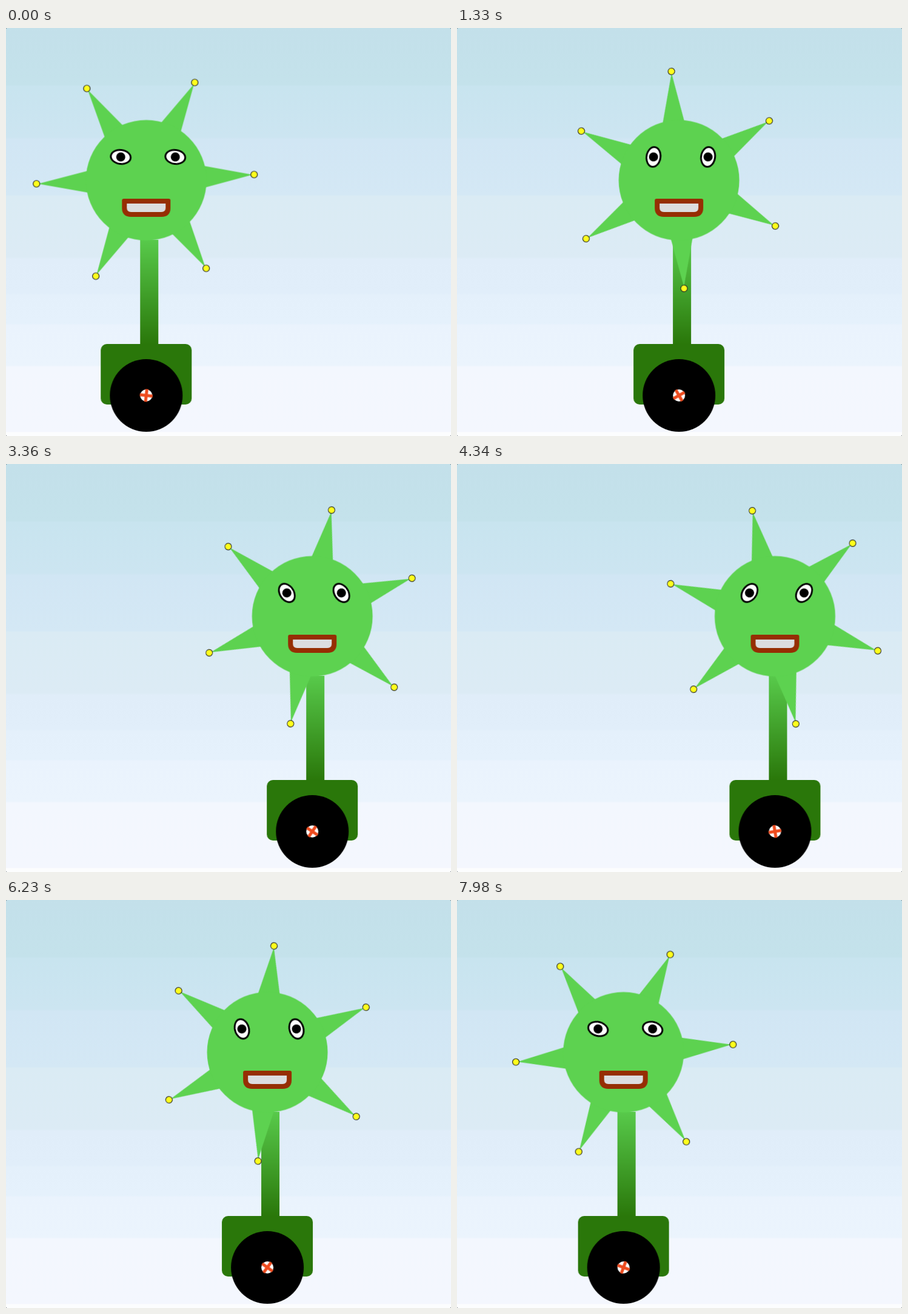
These frames come from a looping animation (734x674 px, 8000 ms). An HTML page:

```html
<!DOCTYPE html>
<html lang="en">
<head>
<meta charset="utf-8">
<title>Rolling sun robot</title>
<style>
  html, body { margin: 0; width: 100%; height: 100%; overflow: hidden; background: #59656a; }
  svg {
    display: block; width: 734px; height: 674px; border-radius: 2px;
    background: linear-gradient(#c3e0ea, #c4e2eb 94px, #c8e4ef 96px, #cce5f1 180px,
      #d1e6f4 184px, #d4e8f5 275px, #daebf4 278px, #dcebf5 378px, #e0edf9 382px,
      #e1eefa 438px, #e4f0fb 441px, #e5f1fc 488px, #eaf3fd 491px, #ebf4fd 557px,
      #f3f7fe 560px, #f4f7fe 667px, #fcfdfe 668px);
  }
  /* Paused: the script sets the time of every animation. */
  #robot, #star, .eye, #cross { animation: linear infinite paused; }
  #robot { animation-name: roll; animation-duration: 10430ms; animation-timing-function: ease; }
  #cross { animation-name: turn; animation-duration: 10430ms; animation-timing-function: ease; }
  .eye { animation-name: spin; animation-duration: 5240ms; }
  #star { animation-name: unwind; animation-duration: 15770ms; }
  @keyframes roll {
    0%, 100% { transform: translateX(228.6px); }
    50% { transform: translateX(528.4px); }
  }
  @keyframes turn {
    0%, 100% { transform: rotate(0deg); }
    50% { transform: rotate(720deg); }
  }
  @keyframes spin { from { transform: rotate(0deg); } to { transform: rotate(360deg); } }
  @keyframes unwind { from { transform: rotate(0deg); } to { transform: rotate(-360deg); } }
</style>
</head>
<body>
<svg viewBox="0 0 734 674">
  <defs>
    <linearGradient id="stem" x1="0" y1="0" x2="0" y2="1">
      <stop offset="0" stop-color="#58ca4b"/>
      <stop offset="1" stop-color="#2a770a"/>
    </linearGradient>
    <g id="eyeball">
      <ellipse rx="16.4" ry="11.5" fill="#fff" stroke="#000" stroke-width="3"/>
      <circle r="7.5"/>
    </g>
  </defs>
  <g id="robot">
    <rect x="-10" y="350" width="30" height="173" fill="url(#stem)"/>
    <g transform="translate(0 251.5)" fill="#5dd250">
      <g id="star"><g id="spikes" transform="rotate(2.2)"></g></g>
      <circle r="99.5"/>
    </g>
    <g transform="translate(-42 213)"><use class="eye" href="#eyeball"/></g>
    <g transform="translate(48 213)"><use class="eye" href="#eyeball"/></g>
    <path d="M-37 282H37q3 0 3 3V297q0 15 -15 15H-25q-15 0 -15 -15V285q0 -3 3 -3z" fill="#962e04"/>
    <path d="M-32 290H32V297q0 7 -7 7H-25q-7 0 -7 -7z" fill="#dcdde0"/>
    <rect x="-75" y="522" width="150" height="100" rx="10" fill="#2a770a"/>
    <g transform="translate(0 607)">
      <circle r="60"/>
      <circle r="10" fill="#fff"/>
      <path id="cross" d="M-10.5 0H10.5M0 -10.5V10.5" stroke="#ee4b1e" stroke-width="5"/>
    </g>
  </g>
</svg>
<script>
  const LOOP = 8000, STEP = 70, LEAD = 95;

  // Tip x, tip y and the direction of the spike's base in degrees
  const spikes = [
    [178, -9.5, -3.5], [80, -161.5, -65], [-98, -151.5, -123.5],
    [-181, 6, 178.5], [-83, 158.5, 117.6], [99, 145.5, 53.8]
  ];

  const basePoint = (deg, side) => {
    const a = deg * Math.PI / 180 + side * 0.178;
    return `${99.4 * Math.cos(a)},${99.4 * Math.sin(a)}`;
  };

  document.getElementById('spikes').innerHTML = spikes.map(([x, y, deg]) => `
    <polygon points="${x * 0.985},${y * 0.985} ${basePoint(deg, 1)} 0,0 ${basePoint(deg, -1)}"/>
    <circle cx="${x}" cy="${y}" r="5.5" fill="#ffff1c" stroke="#222" stroke-width="1.2"/>`).join('');

  const animations = document.getAnimations();

  function draw() {
    const time = performance.now() % LOOP;
    const shown = Math.floor(time / STEP) * STEP + LEAD;
    for (const animation of animations) animation.currentTime = shown;
    requestAnimationFrame(draw);
  }
  draw();
</script>
</body>
</html>
```
